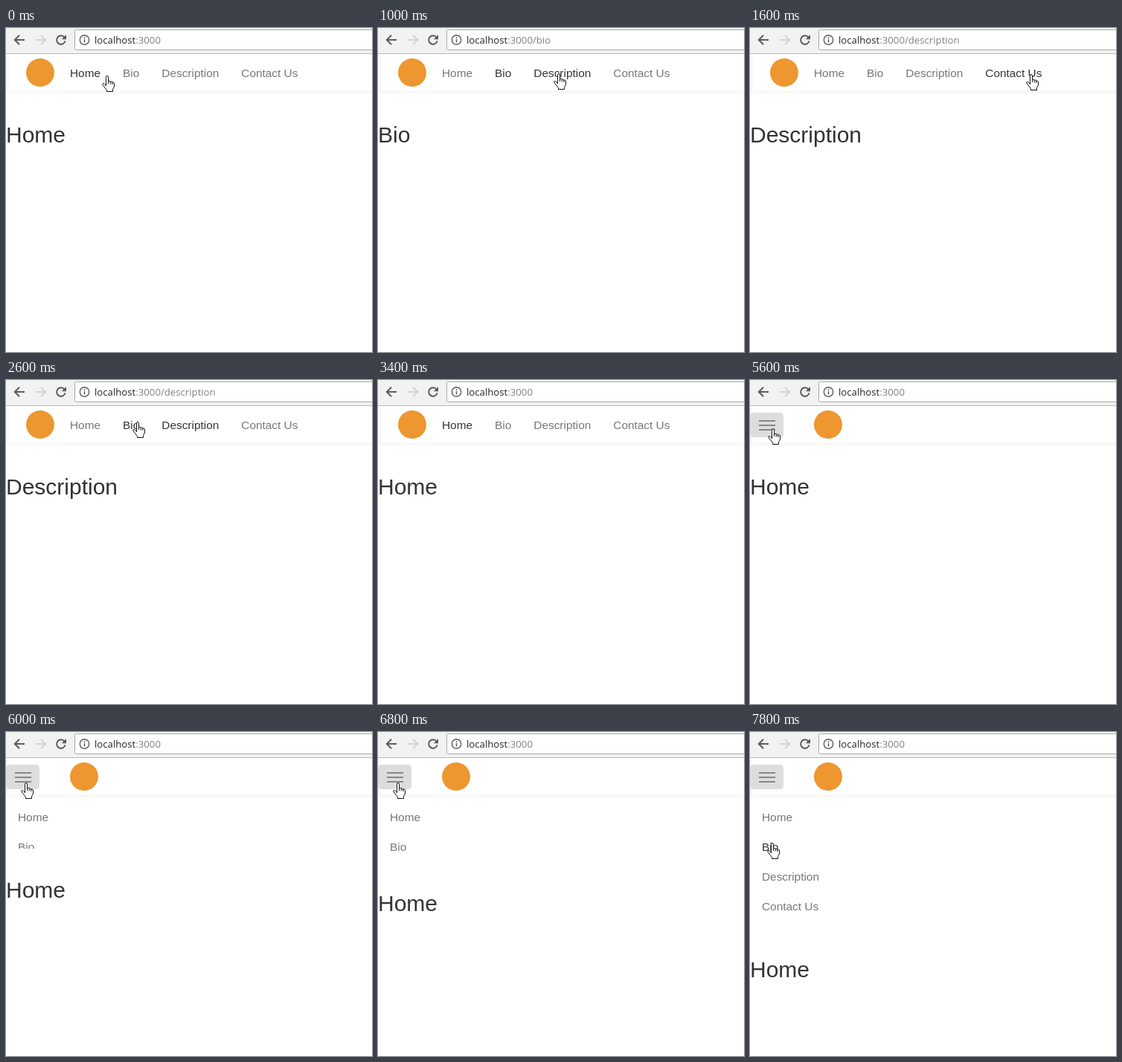
Write an HTML page that moves like this. It is 492 px wide and 436 px high and loops after 8000 ms.

```html
<!DOCTYPE html>
<html lang="en">
<head>
<meta charset="utf-8">
<title>Responsive navigation bar</title>
<style>
  html, body { margin: 0; width: 492px; height: 436px; overflow: hidden; background: #fff; }
  svg { display: block; }
  .link { font: 15.4px "Liberation Sans", Arial, sans-serif; fill: #777; }
  .link.on { fill: #333; }
  #title { font: 30px "Liberation Sans", Arial, sans-serif; fill: #333; }
  .url { font: 13.2px "Open Sans", "Noto Sans", sans-serif; fill: #222; }
  .url tspan { fill: #808080; }
  .icon { fill: none; stroke: #5a5a5a; stroke-width: 2; }
</style>
</head>
<body>
<svg width="492" height="436" viewBox="0 0 492 436">
  <!-- browser toolbar -->
  <rect width="492" height="34" fill="#f2f2f2"/>
  <rect y="34" width="492" height="1" fill="#b8b8b8"/>
  <rect x="92.5" y="2.5" width="420" height="27" rx="2" fill="#fff" stroke="#a9a9a9"/>
  <path class="icon" d="M25 16H12.5M18 9.8L11.8 16L18 22.2"/>
  <path class="icon" style="stroke:#d2d2d2" d="M40 16H52.5M47 9.8L53.2 16L47 22.2"/>
  <path class="icon" d="M78.6 12.6A5.8 5.8 0 1 0 79.6 17.5"/>
  <path d="M81 9V15.2H74.8Z" fill="#5a5a5a"/>
  <circle cx="105.5" cy="16" r="6.2" class="icon" style="stroke-width:1.4"/>
  <path d="M104.8 12.3h1.5v1.6h-1.5zM104.8 15h1.5v4.4h-1.5z" fill="#5a5a5a"/>
  <text class="url" x="119" y="21">localhost<tspan id="path"></tspan></text>

  <!-- navigation bar -->
  <path d="M0 36H4V84H492V88H0Z" fill="#f8f8f8"/>
  <circle id="logo" cy="60" r="19" fill="#ee962f"/>
  <g id="wide"></g>
  <g id="toggle">
    <rect id="button" x="0.5" y="44.5" width="44" height="32" rx="4" stroke="#ddd"/>
    <path d="M12 55H34M12 61H34M12 67H34" stroke="#888" stroke-width="2"/>
  </g>
  <clipPath id="panel"><rect id="panelBox" y="88" width="492"/></clipPath>
  <g id="menu" clip-path="url(#panel)"></g>
  <text id="title" x="0"></text>

  <g id="hand" stroke="#111" stroke-linejoin="round">
    <path fill="#fff" d="M5.5 14V2.2Q5.5.5 7 .5T8.5 2.2V7.5Q10.5 6.3 11.2 8.2Q13 7.2 13.8 9Q16.5 8.5 16.5 11V15L14.5 18.5V21.5H6.5V19.5L1 12.5Q.2 10.5 2.3 10.6Q3.5 10.8 5.5 13.5Z"/>
    <path fill="none" d="M8.5 7.5V11M11.2 8.2V11.5M13.8 9V12"/>
  </g>
</svg>
<script>
const LOOP = 8000;
const PAGES = {
  Home: '', Bio: '/bio', Description: '/description', 'Contact Us': '/contact'
};
const NAMES = Object.keys(PAGES);
const WIDE_X = [86, 157, 209.3, 316.3];

// Each step keeps whatever it does not change.
const STEPS = [
  { t: 0, page: 0, focus: 0, hover: -1, hand: [129, 64], narrow: false, lit: false, open: 0 },
  { t: 200, hover: 1, hand: [167, 63] },
  { t: 600, page: 1, focus: 1 },
  { t: 800, hover: 2, hand: [212, 61] },
  { t: 1000, hover: 2, hand: [236, 61] },
  { t: 1200, page: 2, focus: 2 },
  { t: 1400, hover: 3, hand: [330, 61] },
  { t: 1600, focus: 3, hover: 3, hand: [371, 62] },
  { t: 2000, page: 3 },
  { t: 2200, hover: 2, hand: [236, 60] },
  { t: 2400, page: 2, focus: 2 },
  { t: 2600, hover: 1, hand: [170, 56] },
  { t: 3000, page: 1, focus: 1 },
  { t: 3200, hover: 0, hand: [118, 60] },
  { t: 3400, page: 0, focus: 0, hover: -1, hand: null },
  { t: 4600, focus: -1 },
  { t: 5000, narrow: true },
  { t: 5600, lit: true, hand: [24, 65] },
  { t: 5800, hand: [20, 68] },
  { t: 6000, open: 69 },
  { t: 6200, open: 166 },
  { t: 6400, open: 176 },
  { t: 6800, open: 87 },
  { t: 7000, open: 0 },
  { t: 7200, open: 28 },
  { t: 7400, open: 175, hover: 0, hand: [23, 112] },
  { t: 7800, open: 176, hover: 1, hand: [23, 149] }
];
const states = [];
STEPS.forEach((step, i) => states.push({ ...states[i - 1], ...step }));

const $ = id => document.getElementById(id);
const show = (el, visible) => el.setAttribute('display', visible ? 'inline' : 'none');

function addLinks(group, place) {
  return NAMES.map((name, i) => {
    const el = document.createElementNS('http://www.w3.org/2000/svg', 'text');
    const [x, y] = place(i);
    el.setAttribute('x', x);
    el.setAttribute('y', y);
    el.textContent = name;
    group.append(el);
    return el;
  });
}
const wideLinks = addLinks($('wide'), i => [WIDE_X[i], 66]);
const menuLinks = addLinks($('menu'), i => [16, 120 + 40 * i]);

function draw(s) {
  const name = NAMES[s.page];
  $('path').textContent = ':3000' + PAGES[name];
  $('title').textContent = name;
  $('title').setAttribute('y', 154 + s.open);
  $('logo').setAttribute('cx', s.narrow ? 105 : 46);
  $('button').setAttribute('fill', s.lit ? '#ddd' : 'none');
  $('panelBox').setAttribute('height', s.open);
  show($('wide'), !s.narrow);
  show($('toggle'), s.narrow);
  show($('menu'), s.open > 0);
  for (const links of [wideLinks, menuLinks]) {
    links.forEach((el, i) => {
      el.setAttribute('class', i === s.hover || i === s.focus ? 'link on' : 'link');
    });
  }
  show($('hand'), s.hand);
  if (s.hand) $('hand').setAttribute('transform', `translate(${s.hand})`);
}

let current;
function tick() {
  const t = performance.now() % LOOP;
  const state = states.findLast(s => s.t <= t);
  if (state !== current) draw(current = state);
  requestAnimationFrame(tick);
}
tick();
</script>
</body>
</html>
```
